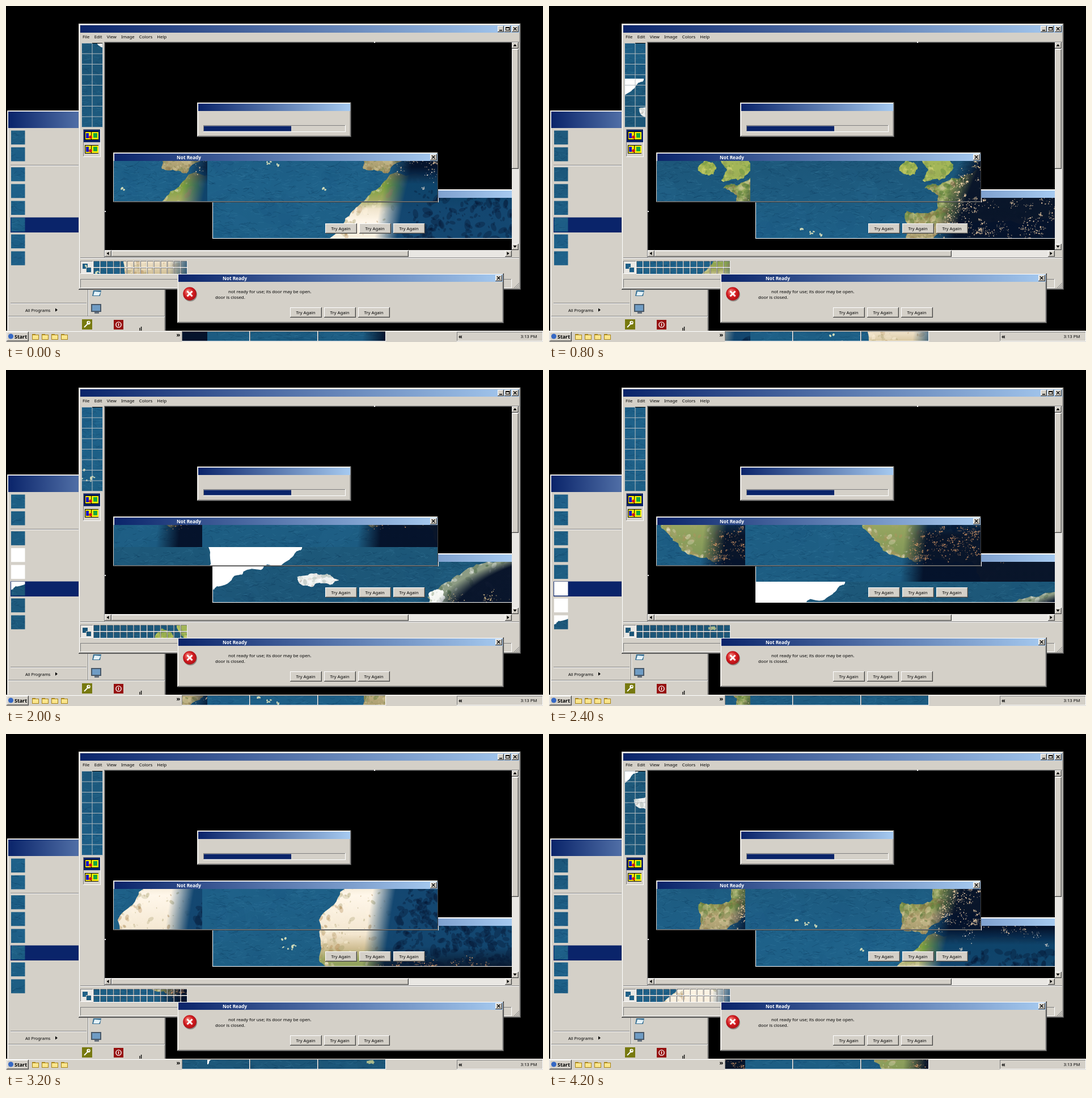
Animation of 947x592 px, one loop 4.4 s. Source, as an HTML page with a canvas:

```html
<!DOCTYPE html>
<html>
<head>
<meta charset="utf-8">
<style>
html, body { margin: 0; width: 100%; height: 100%; overflow: hidden; background: #000; }
canvas { display: block; }
</style>
</head>
<body>
<canvas id="stage" width="947" height="592"></canvas>
<script>
const stage = document.getElementById('stage').getContext('2d');
const GREY = '#d4d0c8', NAVY = '#0a246a', SKY = '#a6caf0', SHADE = '#808080', DARK = '#404040';
const MAP_W = 565, MAP_H = 587, STEP = 30.7, SHIFT = 9, FRAMES = 22;

let seed = 7;
const rnd = () => (seed = seed * 16807 % 2147483647) / 2147483647;
const bell = () => rnd() + rnd() + rnd() - 1.5;
const range = n => [...Array(n).keys()];

// ---------- scrolling world map ----------
const world = document.createElement('canvas');
world.width = MAP_W;
world.height = MAP_H;
const m = world.getContext('2d');

function vertical(...stops) {
  const g = m.createLinearGradient(0, 0, 0, MAP_H);
  for (const [y, color] of stops) g.addColorStop(y / MAP_H, color);
  return g;
}

function spot(x, y, rx, ry, color, alpha = 1) {
  m.globalAlpha = alpha;
  m.fillStyle = color;
  m.beginPath();
  m.ellipse(x, y, rx, ry, rnd() * 3, 0, 7);
  m.fill();
  m.globalAlpha = 1;
}

// midpoint displacement turns a few corners into a ragged coast
function coastline(points, depth = 4) {
  if (!depth) return points;
  return coastline(points.flatMap(([x, y], i) => {
    const [nx, ny] = points[(i + 1) % points.length];
    const reach = Math.min(30, Math.hypot(nx - x, ny - y)) * 0.2;
    return [[x, y], [(x + nx) / 2 + bell() * reach, (y + ny) / 2 + bell() * reach]];
  }), depth - 1);
}

const blob = (cx, cy, rx, ry) => range(7).map(i => {
  const r = 0.8 + rnd() * 0.4;
  return [cx + rx * r * Math.cos(i * 0.9), cy + ry * r * Math.sin(i * 0.9)];
});

function land(fill, corners, speckles, ...tones) {
  const points = coastline(corners);
  const path = new Path2D();
  points.forEach(p => path.lineTo(...p));
  m.fillStyle = fill;
  m.fill(path);
  m.save();
  m.clip(path);
  for (let i = 0; i < speckles; i++) {
    const [x, y] = points[Math.floor(rnd() * points.length)];
    const [x2, y2] = points[Math.floor(rnd() * points.length)];
    const k = rnd() * 0.5, size = 0.6 + 4 * rnd() ** 2;
    spot(x + (x2 - x) * k, y + (y2 - y) * k, size * 1.6, size, tones[i % tones.length], 0.15 + rnd() * 0.35);
  }
  m.restore();
}

function ocean() {
  m.fillStyle = vertical([0, '#1d5879'], [120, '#1c5577'], [300, '#1e6189'], [MAP_H, '#1d5d82']);
  m.fillRect(0, 0, MAP_W, MAP_H);
  for (let i = 0; i < 250; i++)
    spot(rnd() * MAP_W, rnd() * MAP_H, 10 + rnd() * 30, 5 + rnd() * 14, i % 2 ? '#0f476e' : '#2d7698', 0.07);
  for (let i = 0; i < 5000; i++) {
    const x = rnd() * MAP_W, y = rnd() * MAP_H;
    m.strokeStyle = i % 2 ? 'rgba(5,45,75,.24)' : 'rgba(80,150,180,.18)';
    m.beginPath();
    m.moveTo(x, y);
    m.quadraticCurveTo(x + 4, y + bell() * 4, x + 4 + rnd() * 9, y + bell() * 6);
    m.stroke();
  }
}

function islands(x, y, n, spread) {
  for (let i = 0; i < n; i++)
    spot(x + bell() * spread, y + bell() * spread * 0.5, 1 + rnd() * 2.5, 1 + rnd(), '#cfd9b8');
}

const nightEdge = y => 270 + 200 * Math.exp(-y / 260) + 180 * Math.exp(-y / 35);

function night() {
  for (let y = 0; y < MAP_H; y++) {
    const blue = Math.max(0, Math.min(1, (y - 278) / 30, (505 - y) / 40));
    const rgb = [4 + 6 * blue, 16 + 48 * blue, 40 + 68 * blue].map(Math.round).join();
    const edge = nightEdge(y);
    const g = m.createLinearGradient(edge - 18, 0, edge + 22, 0);
    g.addColorStop(0, `rgba(${rgb},0)`);
    g.addColorStop(1, `rgba(${rgb},.96)`);
    m.fillStyle = g;
    m.fillRect(edge - 18, y, MAP_W, 1);
  }
  for (let i = 0; i < 500; i++) {
    const y = 320 + rnd() * 180, size = 1 + 5 * rnd() ** 2;
    spot(nightEdge(y) + 35 + rnd() * 220, y, size * 1.8, size, '#051634', 0.35);
  }
}

function cityLights(top, bottom, clusters, color) {
  for (let i = 0; i < clusters; i++) {
    const y = top + rnd() * (bottom - top), x = nightEdge(y) + 210 * rnd() ** 1.4;
    const spread = 3 + rnd() * 14;
    for (let j = 0; j < 14; j++) {
      const size = 0.4 + rnd() * 0.7;
      spot(x + bell() * spread, y + bell() * spread * 0.7, size, size, color, 0.25 + rnd() * 0.75);
    }
  }
}

function buildWorld() {
  ocean();
  land('#fff', [[0, -5], [172, -2], [145, 22], [70, 40], [15, 71], [0, 86]], 0);
  land('#eef1f0', blob(195, 58, 38, 12), 60, '#9aa8a0', '#c8b8b0', '#fff');
  land('#a9b98c', blob(288, 82, 7, 4), 0);
  land('#8d9c84', [[388, 88], [462, 36], [565, 6], [565, 150], [440, 150]], 200, '#fff', '#42603c');
  land('#f4f6f2', blob(404, 90, 17, 17), 30, '#8a9c7c', '#fff');
  land('#a9b955', blob(278, 157, 17, 13), 40, '#d8d878', '#6f9440');
  land('#a3b658', [[300, 110], [322, 132], [358, 157], [340, 176], [304, 180], [314, 160], [297, 130]],
    140, '#d8d878', '#5f8a3c', '#8a9a50');
  land(vertical([180, '#9aae5c'], [225, '#8a9f5a'], [238, '#7f9c4c'], [258, '#bfae80'], [290, '#a09668']),
    [[565, 150], [400, 160], [335, 187], [307, 193], [331, 205], [326, 233], [276, 233], [275, 282],
      [318, 290], [352, 253], [565, 250]],
    700, '#4f7434', '#d8cda0', '#8c7448');
  land(vertical([292, '#8b8a52'], [312, '#78a03c'], [338, '#a5aa62'], [352, '#f0e4cc'], [375, '#fff7ea'],
    [444, '#f3e6cf'], [469, '#cfbd92'], [489, '#96a560'], [554, '#7d9456']),
    [[322, 292], [565, 300], [565, 590], [417, 590], [400, 552], [300, 553], [244, 533], [206, 490],
      [210, 411], [262, 350]],
    700, '#b58f5c', '#fff4df', '#a9a070');
  islands(90, 265, 3, 4);
  islands(112, 273, 6, 14);
  islands(208, 317, 3, 6);
  islands(146, 451, 4, 8);
  islands(155, 468, 6, 14);
  night();
  cityLights(85, 160, 45, '#e8c890');
  cityLights(160, 285, 85, '#ffdcb0');
  cityLights(290, 330, 4, '#f4e6d8');
  cityLights(488, 549, 50, '#d99a68');
}

// ---------- desktop drawing helpers ----------
function box(x, y, w, h, fill) {
  stage.fillStyle = fill;
  stage.fillRect(x, y, w, h);
}

function bevel(x, y, w, h, raised = true, fill = GREY) {
  const [a, b] = raised ? ['#fff', DARK] : [SHADE, '#fff'];
  box(x, y, w, h, b);
  box(x, y, w - 1, h - 1, a);
  box(x + 1, y + 1, w - 2, h - 2, raised ? '#a5a29b' : fill);
  if (raised) box(x + 1, y + 1, w - 3, h - 3, fill);
}

// window edge: plain outer line, white inner line
function frame(x, y, w, h) {
  box(x, y, w, h, DARK);
  box(x, y, w - 1, h - 1, GREY);
  bevel(x + 1, y + 1, w - 2, h - 2);
  box(x + 2, y + h - 2, w - 3, 1, SHADE);
  box(x + w - 2, y + 2, 1, h - 3, SHADE);
}

function text(s, x, y, { color = '#000', size = 7.8, weight = 400, align = 'left' } = {}) {
  stage.font = `${weight} ${size}px "Noto Sans", sans-serif`;
  stage.textAlign = align;
  stage.fillStyle = color;
  stage.fillText(s, x, y);
  return stage.measureText(s).width;
}

function titleBar(x, y, w, h, label, labelX) {
  const g = stage.createLinearGradient(x, 0, x + w, 0);
  g.addColorStop(0, NAVY);
  g.addColorStop(1, SKY);
  box(x, y, w, h, g);
  if (label) text(label, labelX, y + h - 3, { color: '#fff', size: 8.3, weight: 700 });
}

function shape(color, ...points) {
  stage.fillStyle = color;
  stage.beginPath();
  for (let i = 0; i < points.length; i += 2) stage.lineTo(points[i], points[i + 1]);
  stage.fill();
}

function line(color, width, x1, y1, x2, y2) {
  stage.strokeStyle = color;
  stage.lineWidth = width;
  stage.beginPath();
  stage.moveTo(x1, y1);
  stage.lineTo(x2, y2);
  stage.stroke();
}

function cross(cx, cy, r, color, width) {
  line(color, width, cx - r, cy - r, cx + r, cy + r);
  line(color, width, cx + r, cy - r, cx - r, cy + r);
}

function disc(x, y, r, color) {
  stage.fillStyle = color;
  stage.beginPath();
  stage.arc(x, y, r, 0, 7);
  stage.fill();
}

function groove(x, y, w) {
  box(x, y, w, 1, SHADE);
  box(x, y + 1, w, 1, '#fff');
}

function closeButton(x, y) {
  bevel(x, y, 12, 11);
  cross(x + 5.7, y + 5.2, 2.8, '#000', 1.3);
}

function arrowButton(x, y, dx, dy) {
  bevel(x, y, 12, 11);
  const cx = x + 5.5, cy = y + 5;
  shape('#000', cx + 2 * dx, cy + 2 * dy,
    cx - 2 * dx + 3 * dy, cy - 2 * dy + 3 * dx, cx - 2 * dx - 3 * dy, cy - 2 * dy - 3 * dx);
}

function retryButtons(x, y) {
  for (let i = 0; i < 3; i++) {
    bevel(x + i * 60, y, 56, 18);
    text('Try Again', x + i * 60 + 27.5, y + 11.5, { align: 'center' });
  }
}

// ---------- places through which the map shows ----------
const cells = (cols, rows, x, y, stepX, stepY, w, h) => range(cols * rows)
  .map(i => [x + i % cols * stepX, y + Math.floor(i / cols) * stepY, w, h]);
const menuIcons = range(8).map(i => [9, 219.5 + 29.6 * i + (i > 1 ? 5.5 : 0), 24.5, 24.5]);
const toolCells = cells(2, 8, 134, 66, 18.5, 18.5, 17.5, 17.5);
const swatches = cells(14, 2, 155, 450, 11.85, 12, 10, 10);
const picked = cells(2, 1, 135, 454, 6, 0, 9, 9).map(([x, y, w, h], i) => [x, y + 6 * i, w, h]);
const tasks = cells(3, 1, 311, 574, 120, 0, 118, 16);

const openings = new Path2D();
for (const r of [[190, 273, 571, 71], [365, 346, 527, 63], [763, 338, 129, 8],
  ...menuIcons, ...toolCells, ...swatches, ...picked, ...tasks]) openings.rect(...r);

function drawMap(step) {
  stage.save();
  stage.clip(openings);
  for (let k = -1; k < 3; k++) {
    const x = -SHIFT * k, y = Math.round(5 + STEP * step - MAP_H * k);
    stage.drawImage(world, x, y);
    stage.drawImage(world, x + 355, y);
  }
  stage.restore();
  line(GREY, 1, 141, 460.5, 150, 460.5);
  line(GREY, 1, 141.5, 460, 141.5, 469);
}

// ---------- desktop parts ----------
function startMenu() {
  frame(2, 184, 280, 392);
  titleBar(4, 186, 276, 29);
  groove(8, 280, 120);
  box(8, 372.5, 122, 26.5, NAVY);
  groove(8, 523, 134);
  groove(4, 546, 276);
  box(144, 499, 1, 47, SHADE);
  box(145, 499, 1, 47, '#fff');
  text('All Programs', 34, 538.5, { size: 7.4 });
  shape('#000', 87, 532.5, 91, 535.5, 87, 538.5);
  shape('#3c7396', 154, 501, 168, 501, 166, 511, 152, 511);
  shape('#e4f2f8', 156, 503, 167, 504, 164, 510, 154, 510);
  box(150, 525, 18, 14, '#485868');
  box(152, 527, 14, 10, '#6f9cc4');
  box(156, 539, 8, 3, '#66707c');
  box(134, 552, 18, 18, '#77790f');
  disc(145.5, 558, 3.2, '#fff');
  disc(146, 557.5, 1.2, '#8d8d21');
  line('#fff', 1.8, 144, 560, 138, 566);
  box(190, 553, 17, 17, '#96100f');
  disc(198.5, 561.5, 5.3, '#fff');
  disc(198.5, 561.5, 3.9, '#96100f');
  line('#fff', 1.4, 198.5, 559, 198.5, 564);
  line('#000', 1.3, 236, 567, 236, 572);
  line('#000', 1.3, 238.6, 565, 238.6, 572);
}

function toolOption(y) {
  box(139, y, 24, 15, '#000');
  box(140, y + 1, 10, 13, '#ffee00');
  box(151, y + 1, 12, 13, '#ffee00');
  box(141, y + 3, 5, 9, '#1515c8');
  box(154, y + 3, 7, 8, '#14a83c');
  disc(149, y + 10, 2.8, '#d01818');
}

function paintWindow() {
  frame(128, 31, 780, 469);
  titleBar(131, 34, 774, 13);
  bevel(867, 35, 11, 11);
  box(870, 42, 5, 1.5, '#000');
  bevel(879, 35, 11, 11);
  box(881, 37, 7, 6, '#000');
  box(882, 39, 5, 3, GREY);
  closeButton(892, 35);
  let x = 135;
  for (const s of ['File', 'Edit', 'View', 'Image', 'Colors', 'Help']) x += 8.2 + text(s, x, 57);

  box(133, 65, 38, 149, '#b4bcc0');
  box(152, 65, 18, 1, '#000');
  bevel(136, 217, 31, 49, false);
  box(137, 218, 29, 22, NAVY);
  toolOption(221);
  toolOption(245);

  box(173, 63, 732, 380, SHADE);
  box(174, 64, 731, 379, DARK);
  box(175, 65, 717, 366, '#000');
  box(649, 63, 2, 2, '#fff');
  box(174, 361, 2, 2, '#fff');
  box(892, 64, 13, 379, '#e9e7e3');
  box(174, 430, 731, 13, '#e9e7e3');
  arrowButton(892, 64, 0, -1);
  bevel(892, 76, 12, 211);
  arrowButton(892, 419, 0, 1);
  arrowButton(174, 431, -1, 0);
  bevel(186, 431, 524, 11);
  arrowButton(880, 431, 1, 0);
  box(892, 430, 13, 13, GREY);
  groove(131, 443, 774);

  bevel(131, 449, 23, 23, false, '#eae8e4');
  for (const [sx, sy] of swatches) bevel(sx - 1, sy - 1, 12, 12, false, DARK);
  bevel(131, 481, 761, 16, false);
  for (let i = 0; i < 3; i++) line(SHADE, 1, 896 + i * 3, 497, 905, 488 + i * 3);
}

function dialogs() {
  frame(337, 170, 272, 61);
  titleBar(339, 172, 268, 13);
  bevel(348, 210, 251, 12, false);
  box(349, 211.5, 154, 9, NAVY);

  box(364, 323, 528, 87, '#fff');
  titleBar(366, 325, 526, 13);
  frame(189, 258, 573, 88);
  titleBar(191, 260, 570, 13, 'Not Ready', 301);
  closeButton(748, 261);

  frame(302, 471, 576, 88);
  titleBar(304, 473, 572, 13, 'Not Ready', 382);
  closeButton(863, 474);
  disc(325, 508.5, 12, '#8f8c86');
  const g = stage.createRadialGradient(320, 502, 1, 324, 507, 13);
  g.addColorStop(0, '#f08078');
  g.addColorStop(0.6, '#d21c20');
  g.addColorStop(1, '#a50c12');
  disc(324, 507, 11.8, g);
  cross(324, 507, 4.5, '#fff', 3);
  text('not ready for use; its door may be open.', 392, 506);
  text('door is closed.', 369, 515.5);
  retryButtons(501, 531);
}

function taskbar() {
  box(0, 572, 947, 20, GREY);
  box(0, 573, 947, 1, '#fff');
  bevel(1, 574, 39, 17);
  disc(8.5, 582, 4.5, '#3568c4');
  text('Start', 15, 585.5, { size: 8.9, weight: 700 });
  for (let x = 46; x < 100; x += 17) {
    box(x, 578, 6, 3, '#a88418');
    box(x, 579, 12, 9, '#a88418');
    box(x + 1, 580, 10, 7, '#fbe68c');
  }
  text('»', 300.5, 583, { size: 11, weight: 700 });
  for (const [x] of tasks) bevel(x - 1, 573, 120, 18, false);
  bevel(795, 574, 152, 17, false);
  text('«', 798, 585.5, { size: 11, weight: 700 });
  text('3:13 PM', 907.5, 585, { size: 7.7 });
}

function draw(step) {
  box(0, 0, 947, 592, '#000');
  startMenu();
  paintWindow();
  dialogs();
  taskbar();
  drawMap(step);
  retryButtons(563, 383);
}

buildWorld();
let shown = -1;
function tick() {
  const step = Math.floor(performance.now() / 200) % FRAMES;
  if (step !== shown) draw(shown = step);
  requestAnimationFrame(tick);
}
tick();
</script>
</body>
</html>
```
